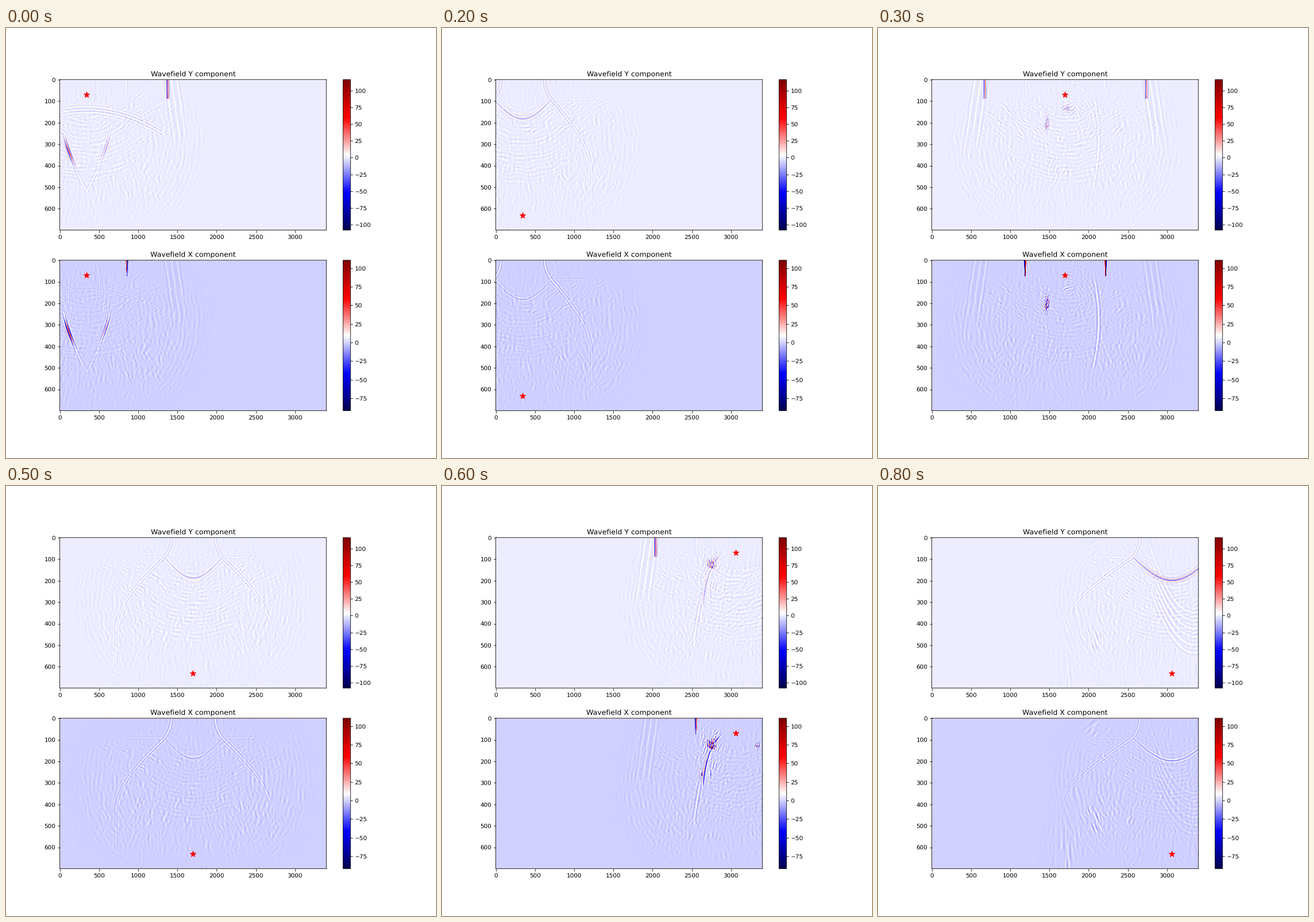
These frames come from a looping animation (748x748 px, 900 ms). A matplotlib script:

```python
import numpy as np
import matplotlib.pyplot as plt
from matplotlib.animation import FuncAnimation

W, H = 464, 262                 # panel size in pixels
NX, NZ = 3400, 700              # model size in cells
SEABED = 34                     # pixels below the surface
U, V = np.meshgrid(np.arange(W) + 0.5, np.arange(H) + 0.5)
FX, FY = np.meshgrid(np.fft.fftfreq(W), np.fft.fftfreq(H))
FREQ, THETA = np.hypot(FX, FY), np.arctan2(FY, FX)
DOWN = np.pi / 2
SIDES = (-1, 1)


def noise(seed, wl, angle=0, spread=9, band=0.4):
    """Band-passed noise of unit deviation; angle is the wave direction."""
    white = np.random.default_rng(seed).standard_normal((H, W))
    keep = np.exp(-((FREQ * wl - 1) / band) ** 2
                  - (np.sin(THETA - angle) / spread) ** 2)
    n = np.fft.ifft2(np.fft.fft2(white) * keep).real
    return n / n.std()


def step(d, soft=3):
    return 0.5 + 0.5 * np.tanh(d / soft)


def between(x, lo, hi, soft=3):
    return step(x - lo, soft) * step(hi - x, soft)


def source_at(i):
    """Source position in cells."""
    col, row = divmod(i, 3)
    return 340 + 1360 * col, 70 + 280 * row


class Field:
    """Both components of a wavefield; gains are given as (y, x)."""

    def __init__(self, i):
        self.seed = 100 * (i + 1)
        self.src = source_at(i)[0] * W / NX
        self.off = U - self.src
        self.y, self.x = np.zeros((H, W)), np.zeros((H, W))

    def add(self, a, gain):
        self.y += gain[0] * a
        self.x += gain[1] * a

    def noise(self, *args):
        self.seed += 1
        return noise(self.seed, *args)

    def front(self, level, env, gain, wl=4.5, cyc=0.8, phase=0):
        """Wavelet along the zero line of level, with cyc setting its length."""
        dv, du = np.gradient(level)
        s = level / np.maximum(np.hypot(du, dv), 0.3)
        wave = np.cos(2 * np.pi * s / wl + phase)
        self.add(env * wave * np.exp(-(s / (wl * cyc)) ** 2), gain)

    def rings(self, v, r0, r1, wl, gain, angle=DOWN, half=0.6):
        """Uneven arcs around a point below the source."""
        r = np.hypot(self.off, V - v)
        turn = np.angle(np.exp(1j * (np.arctan2(V - v, self.off) - angle)))
        env = between(r, r0, r1, 8) * np.exp(-(turn / half) ** 4)
        fade = np.clip(0.7 + 0.5 * self.noise(28), 0, 2)
        bend = 0.8 * self.noise(40)
        self.add(env * fade * np.cos(2 * np.pi * r / wl + bend), gain)

    def grain(self, du, v, size, wl, gain, angle=0, spread=0.5, power=1):
        """Patch of ripples at an offset from the source."""
        q = ((self.off - du) / size[0]) ** 2 + ((V - v) / size[1]) ** 2
        fade = np.clip(0.8 + 0.5 * self.noise(30), 0, 2)
        n = self.noise(wl, angle, spread)
        self.add(np.exp(-q ** power) * n * fade, gain)

    def coda(self):
        """Scattered energy shared by every shot."""
        for side in SIDES:
            angle = 0.2 if side > 0 else np.pi - 0.2
            self.rings(105, 95, 200, 8, (1.3, 1.7), angle)
            self.grain(side * 85, 75, (75, 50), 6, (1.6, 1.3), side * 0.9)
            self.grain(side * 80, 170, (70, 60), 7, (1.1, 1.6), -side * 0.3)
        self.rings(10, 45, 170, 7, (2, 1.3))
        self.grain(0, 130, (185, 130), 8, (0.7, 0.9), power=3)

    def surface_waves(self):
        """Bars running along the surface and the fronts hanging below."""
        for side in SIDES:
            s = side * self.off - 140.5
            bar = np.sin(1.5 * s) * np.exp(-(s / 2.6) ** 2)
            self.add(side * bar * (V < SEABED - 0.5), (50, 2))
            s = side * self.off - 70
            wide = 0.5 + 1.3 * np.clip(1 - V / 28, 0, 1)
            bar = np.sin(2 * s / wide) * np.exp(-(s / wide) ** 2) * (V < 28)
            self.add(-bar, (6, 130))
            for lag in (0, 10, 20):
                line = side * self.off - 137 - lag - 0.15 * V
                self.front(line, between(V, -9, 110, 25), (4, 4), 7)

    def arch(self, half, dip, spread, bowl, flank, sides=SIDES):
        """Bowl under the source, with peaks on the seabed and long flanks."""
        out = np.abs(self.off) - half
        t = np.clip((V - SEABED) / 130, 0, 1)
        sag = np.cos(DOWN * np.clip(self.off / half, -1, 1))
        weight = between(out, -9e3, 0) * (0.4 + 0.6 * sag)
        self.front(V - SEABED - dip * sag, weight, bowl, 5, 0.7, 3)
        self.front(V - SEABED, between(out, 0, 60, 9), np.multiply(flank, .3))
        for side in sides:
            here = side * self.off > 0
            below = here * step(V - SEABED) * np.exp(-(V - SEABED) / 120)
            self.front(out - spread * np.sin(DOWN * t), below, flank, 4.5, 1.3)
            above = here * step(SEABED - V)
            horn = out + 12 * (1 - (V / SEABED) ** 2)
            self.front(horn, above, flank, 4.5)


def left_shallow(f):
    f.surface_waves()
    half = 44 * (1 - np.clip((V - 70) / 125, 0, 1) ** 1.5)
    for side, v, gain in ((-1, 125, (60, 80)), (1, 118, (22, 35))):
        env = (side * f.off > 0) * np.exp(-((V - v) / 20) ** 2)
        f.front(side * f.off - half, env, gain, 4, phase=1)
        for k in range(4):
            line = side * f.off - 38 + 3 * k + 7 * np.sin(V / 38)
            f.front(line, between(V, 15, 112, 9), (2, 4), 4)
    f.front(np.abs(f.off) - half, between(V, 150, 200, 6), (5, 5), 5)
    f.front(V - 52 - f.off ** 2 / 420, between(U, 5, 175, 15), (7, 1.5), 5, 1.6)
    f.front(V - 98 + 0.59 * (U - 80), between(U, 80, 178, 15), (4, 1), 5)
    f.grain(104, 209, (32, 4), 5, (2.5, 2))


def left_mid(f):
    f.arch(28, 26, 25, (110, 30), (34, 46))
    f.front(V - SEABED, between(U, 20, 75), (10, 2), 4)
    f.rings(-10, 70, 165, 6, (3, 2))
    f.rings(90, 50, 120, 8, (1.4, 1.2))
    f.front(f.off - 138 - 29 * np.sin(V / 60), between(V, 0, 95, 15), (4, 6), 7)
    f.grain(110, 175, (50, 45), 7, (1.6, 2.2), -0.15, 0.3)


def left_deep(f):
    f.arch(50, 34, 70, (18, 8), (9, 9))


def mid_shallow(f):
    f.surface_waves()
    f.grain(-32, 72, (4, 17), 3.5, (20, 42), 0.3, 0.7)
    f.grain(9, 50, (25, 10), 5, (6, 3), 1)
    line = f.off - 58 + ((V - 105) / 26) ** 2
    f.front(line, between(V, 35, 185, 15), (4, 10), 6)
    f.rings(70, 18, 62, 6, (2, 2), -0.3, 1.3)
    f.grain(-13, 155, (14, 24), 7, (2.5, 2), 0.5)


def mid_mid(f):
    f.arch(39, 44, 80, (8, 6), (9, 8), (-1,))
    f.grain(18, 70, (14, 8), 5, (34, 14), 1.2, 0.6)
    f.rings(30, 40, 90, 6, (2.5, 2.2), half=0.8)
    for side in SIDES:
        line = side * (f.off - 17) - 38 * np.cos((V - 30) / 45)
        f.front(line, between(V, 0, 70, 9), (2, 5), 5, 1.8)
    f.grain(-115, 183, (9, 26), 7, (9, 28), 0, 0.15, 3)
    f.grain(-110, 188, (30, 24), 6, (3, 5), 0, 0.3, 3)
    f.grain(-106, 209, (36, 3), 5, (7, 6), 0, 0.3, 3)


def mid_deep(f):
    f.arch(50, 36, 85, (14, 7), (8, 9))


def right_shallow(f):
    f.surface_waves()
    line = f.off + 60 - 32 * np.exp(-(V - 30) / 35)
    f.front(line, between(V, 32, 115, 6), (16, 42), 4.5, 0.6, 2.5)
    f.front(f.off + 44 + V / 6, between(V, 110, 175, 9), (6, 9), 6)
    f.grain(-41, 42, (12, 14), 4, (14, 24), 0.5, 0.8)
    for du in (-59, -44):
        f.grain(du, 100, (3, 5), 4, (9, 42))
    f.grain(37, 43, (4, 9), 4, (8, 38), 0.3)
    f.grain(-45, 60, (22, 45), 5, (4, 7), 0.3, 0.4)
    f.grain(0, 120, (55, 60), 7, (1.6, 1.3), 1)


def right_mid(f):
    f.arch(55, 40, 65, (40, 15), (11, 18))


def right_deep(f):
    f.arch(68, 40, 122, (32, 14), (8, 7))
    for k in range(6):
        line = V - 130 - 14 * k + 70 * ((f.off - 38) / 60) ** 2
        f.front(line, between(f.off, -40, 60, 9), (4, 2.5), 7)
    f.grain(-134, 176, (20, 24), 6, (4, 6), -0.4, 0.3)
    f.grain(-182, 225, (24, 42), 8, (1.2, 3.8), 0, 0.2)
    f.grain(-135, 20, (24, 18), 9, (0.9, 3), 0.7, 0.3)


shots = (left_shallow, left_mid, left_deep,
         mid_shallow, mid_mid, mid_deep,
         right_shallow, right_mid, right_deep)
fields = [Field(i) for i in range(len(shots))]
for shot, field in zip(shots, fields):
    field.coda()
    shot(field)

plt.rcParams.update({'font.family': 'DejaVu Sans', 'text.hinting': 'none',
                     'path.snap': False})
fig, axes = plt.subplots(2, 1, figsize=(10, 10), dpi=74.8)
images, stars = [], []
limits = ((-108.2, 116.5), (-91.9, 110.8))
for ax, name, (lo, hi) in zip(axes, 'YX', limits):
    im = ax.imshow(np.zeros((H, W)), cmap='seismic', vmin=lo, vmax=hi,
                   aspect='auto', extent=(-0.5, NX - 0.5, NZ - 0.5, -0.5))
    ax.set_title(f'Wavefield {name} component')
    fig.colorbar(im, ax=ax)
    images.append(im)
    stars.append(ax.scatter(*source_at(0), s=100, c='red', marker='*',
                            zorder=3))


def draw(i):
    images[0].set_data(fields[i].y)
    images[1].set_data(fields[i].x)
    for star in stars:
        star.set_offsets([source_at(i)])
    return images + stars


anim = FuncAnimation(fig, draw, frames=len(shots), interval=100,
                     repeat=True, repeat_delay=0)
plt.show()
```
